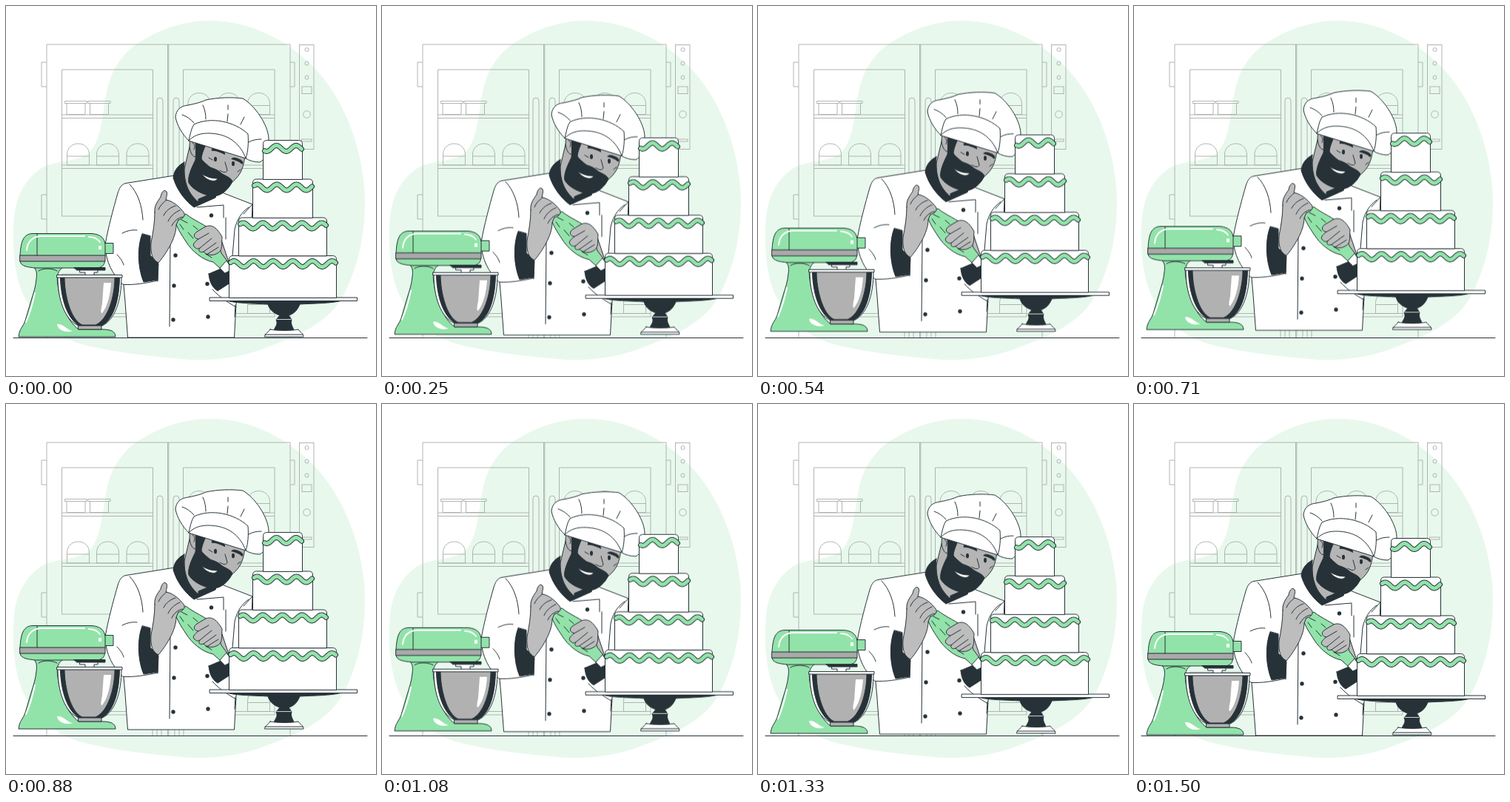
An HTML page that plays this animation: 500 px wide and 500 px high, repeating every 1540 ms.

```html
<!DOCTYPE html>
<html lang="en">
<head>
<meta charset="utf-8">
<title>Pastry chef</title>
<style>
  html, body { margin: 0; width: 100%; height: 100%; overflow: hidden; background: #fff; }
  svg { display: block; width: 100%; height: 100%; }
  .thin { fill: none; stroke: #a9adaa; stroke-width: .9; }
  .ink { stroke: #263238; stroke-width: 1; stroke-linejoin: round; stroke-linecap: round; }
  .white { fill: #fff; }
  .green { fill: #92e3a9; }
  .skin { fill: #b5b5b5; }
  .hand { fill: #bdbdbd; }
  .steel { fill: #b1b1b1; }
  .dark { fill: #263238; }
  .line { fill: none; }
  .shine { fill: none; stroke: #fff; stroke-width: 2; stroke-linecap: round; }
  .float { animation: float 1540ms linear infinite; }
  @keyframes float {
    0%, 95.5%, 100% { transform: translateY(0); }
    47.5% { transform: translateY(-10px); }
  }
</style>
</head>
<body>
<svg viewBox="0 0 500 500">
  <defs>
    <g id="dome">
      <path d="M-15 17V15C-15 -5 15 -5 15 15V17"/>
      <path d="M-15 17H15V29H-15Z"/>
    </g>
    <g id="pot">
      <path d="M-15 0H15V3H-15ZM-12.5 3V18H12.5V3"/>
    </g>
  </defs>

  <path fill="#e8f8ed" d="M270 20C330 18 380 47 413 80C456 122 481 190 484.500 250C487 300 478 352 453 396C430 434 380 451 340 466C312 475 282 479 250 478C198 474 138 467 99 456C61 444 36 419 22 387C10 357 8 317 11 285C14 256 27 233 48 219C68 208 94 211 110 200C130 185 130 143 137 112C143 86 157 64 180 49C207 32 237 21 270 20Z"/>

  <!-- cabinet -->
  <g class="thin">
    <path d="M55 448V52H384V448M218.500 52V448M219.800 52V448"/>
    <path d="M55 76H48V109H55M55 255H48V288H55M384 76H390V109H384"/>
    <path d="M75.500 86H198.500V284H75.500ZM75.500 147H198.500M75.500 151.500H198.500M75.500 215H198.500M75.500 219.500H198.500"/>
    <path d="M239.500 86H363V284H239.500ZM239.500 147H363M239.500 151.500H363M239.500 215H363M239.500 219.500H363"/>
    <rect x="204" y="124" width="8" height="112" rx="4"/>
    <rect x="226" y="124" width="8" height="112" rx="4"/>
    <path d="M75.500 362H198.500V420H75.500ZM75.500 415.500H198.500M239.500 362H363V420H239.500ZM239.500 415.500H363"/>
    <path d="M198 420V448M204 420V448M210 420V448M228 420V448M234 420V448M240 420V448"/>
    <use href="#pot" x="94.500" y="128.500"/><use href="#pot" x="126" y="128.500"/>
    <use href="#dome" x="97.500" y="186"/><use href="#dome" x="137.500" y="186"/><use href="#dome" x="178" y="186"/>
    <use href="#dome" x="261" y="117.500"/><use href="#dome" x="301" y="117.500"/><use href="#dome" x="341.500" y="117.500"/>
    <use href="#dome" x="341.500" y="386.500"/>
    <rect x="396.500" y="52.500" width="19.500" height="141"/>
    <circle cx="406.500" cy="59" r="2.500"/><circle cx="406.500" cy="77.500" r="2.500"/><circle cx="406.500" cy="96.500" r="2.500"/>
    <rect x="400" y="109" width="13" height="9.500"/>
    <circle cx="406.500" cy="146.500" r="4.800"/>
    <rect x="399.500" y="180" width="13.500" height="3"/>
  </g>

  <g class="float">
    <!-- jacket -->
    <g class="ink">
      <path class="white" d="M228 229L162 239.500C155 241 153 247 151 253C145 274 138 300 134.500 320C133 337 140 357 153 371C155 374 157 376 159 376.500L161 400L164.500 448H308.500L311 402L330 345L333 268L284 249Z"/>
      <path class="line" d="M167 241C178 252 184 270 185 289M157 307C163 304 170 302 177 303M150 336C155 341 158 346 159 350"/>
      <path class="line" d="M159 376.500C173 377 187 375 205 371M205 348V372M222 320L221 433M258 272L294 269V286M297 286V315"/>
      <path class="line" d="M328 272C319 278 312 288 309 302L306 338M333 268L321 281"/>
      <path class="line" d="M279 383C288 393 299 400 311 407M310 404L309 420"/>
    </g>
    <g class="dark">
      <circle cx="277.500" cy="283" r="2.700"/><circle cx="229" cy="337" r="2.700"/><circle cx="227" cy="378" r="2.700"/>
      <circle cx="226" cy="424" r="2.700"/><circle cx="272" cy="375.500" r="2.700"/><circle cx="273" cy="420" r="2.700"/>
    </g>

    <!-- head -->
    <g class="ink">
      <path class="skin" d="M251 178L241 220C240 243 249 260 257 267L284 255L290 230L270 180Z"/>
      <path class="dark" d="M241 211C233 215 227 222 226 232C231 249 242 263 254 272L283 259L286 250L260 261V265C247 254 239 239 241 211Z"/>
      <path class="skin" d="M257 176C247 174 246 192 251 200C253 204 257 205 260 202Z"/>
      <path class="skin" d="M259 174C256 205 257 235 270 249C284 257 296 249 303 240C315 231 321 222 323 201L310 172L270 168Z"/>
      <path class="dark" d="M256 172C256 188 257 198 256 208C251 218 245 231 247 239C253 249 268 256 280 257C292 257 302 246 306 237C303 231 297 230 291 226C286 221 281 220 276 218C270 213 265 209 264 206C265 196 271 187 276 172Z"/>
      <path class="white" d="M265 227C273 232 279 233 286 233C284 239 271 237 265 227Z"/>
      <path class="line" d="M296 211L299 222C298 226 293 225 289 222M274 205L279 208M313 224L317 221M252 185C255 186 256 190 254 194"/>
    </g>
    <g class="dark">
      <path d="M278 196C277 191 281 189 287 191C292 193 297 197 296 201C291 199 284 195 278 196Z"/>
      <path d="M304 207C307 203 312 205 316 207C320 209 322 212 319 214C315 210 309 208 304 207Z"/>
      <ellipse cx="283" cy="207" rx="2" ry="3.200"/><ellipse cx="307" cy="213" rx="2" ry="3.200"/>
    </g>

    <!-- hat -->
    <g class="ink">
      <path class="white" d="M247 182C238 173 231 161 229 150C230 140 236 135 246 134C256 132 264 130 270 127C286 123.500 306 123 320 125C336 134 354 160 355 179C355 197 350 208 343 211C335 211 329 209 324 206Z"/>
      <path class="white" d="M247 182C249 174 250 166 254 160C277 149 309 156 327 173C328 185 327 197 324 206C317 187 303 176 285 173C272 171 257 171 247 182Z"/>
      <path class="line" d="M238 147C244 149 250 153 254 158M266 134C269 140 270 147 270 153M300 134V140M300 146L299 156M322 150L317 160M345 180C339 180 333 181 328 184"/>
    </g>

    <!-- arms and piping bag -->
    <g class="ink">
      <path class="dark" d="M184 308C177 326 178 354 186 373L205 370L206 348L195 337L195 311Z"/>
      <path class="dark" d="M274 362L300 351L303 374L286 385C278 380 275 372 274 362Z"/>
      <path class="hand" d="M284 334L291 316L301 346L292 356Z"/>
      <path class="green" d="M232 290L243 281C254 290 270 296 279 304C287 314 288 326 291 334L300 346L291 356L280 346C265 343 251 331 243 318C237 309 232 301 230 295Z"/>
      <path class="white" d="M289 354L298 344L302 350V358L296 361Z"/>
      <path class="line" d="M237 289L245 293M235 295L240 302M246 306L253 314M253 297L259 302M270 335L278 340"/>
      <path class="hand" d="M201 279C200 270 205 264 209 258C210 252 213 248 216 250C219 252 217 257 216 262C224 263 234 270 241 280C242 285 238 288 233 289L230 296C230 314 216 335 206 347C198 343 195 335 196 320C199 305 201 292 201 279Z"/>
      <path class="line" d="M217 262C212 266 208 270 206 275M229 270C222 272 216 277 213 283M235 276C228 279 222 284 219 291M239 285C232 286 227 291 224 297"/>
      <path class="hand" d="M255 326C250 323 256 318 260 315C254 314 252 309 258 305L268 299C278 293 286 301 292 312C291 322 294 331 284 335C278 338 270 336 267 332C262 334 259 331 262 327C259 329 257 328 255 326Z"/>
      <path class="line" d="M260 315L274 307M262 327L278 314M267 332L284 320M271 336L287 326"/>
    </g>

    <!-- mixer -->
    <g class="ink">
      <path class="green" d="M34 351C42 354 42 362 41 369C40 380 37 388 34 398L26 425C23 434 18 436 17 447H148C148 440 142 437 130 437H98C82 425 73 400 70 377C68 365 70 356 78 353Z"/>
      <path class="green" d="M19 345C20 352 30 353 40 354H121C130 354 133 350 133.500 345Z"/>
      <path class="line" d="M44 358C50 354 62 354 69 358"/>
      <path class="dark" d="M92 353.500H134V357H96Z"/>
      <path class="white" d="M100 357H124V360H119V365H107V360H100Z"/>
      <path class="green" d="M132 320.500H145V334.500H132Z"/>
      <path class="green" d="M19 337C20 317 24 308 36 307.500H116C128 308.500 133 314 134 322V337Z"/>
      <path fill="#a9a9a9" d="M19 337H134V345H19Z"/>
      <path class="line" d="M42 307.500V337"/>
      <path class="white" d="M70 367C70 396 79 424 98 432H130C148 424 156 396 156 367Z"/>
      <path class="dark" d="M73.500 367C74 396 83 423 99 432H129C146 424 153 396 153.500 367Z"/>
      <path class="steel" d="M79 367C79 390 87 424 103 431H121C138 424 147 392 147 367Z"/>
      <path class="steel" d="M98 432H129V437H98Z"/>
      <path class="white" d="M69 363.500H157V367H69Z"/>
    </g>
    <g class="shine">
      <path d="M28 330C29 319 34 312 47 311H106M112 312C119 312 124 315 127 319"/>
      <path d="M127 324V329" stroke-width="4" stroke-linecap="butt"/>
      <path d="M39 388C36 402 32 416 27 427"/>
    </g>
    <g class="white">
      <path d="M132 374H142C141 391 137 406 130 415C127 416 129 407 130 402Z"/>
      <path d="M69 430C78 429 81 437 90 439C83 442 70 439 69 430Z"/>
    </g>

    <!-- cake stand -->
    <g class="ink">
      <path class="dark" d="M298 398H454C442 402 412 402 397 403C394 411 389 416 382 418L386 424C384 430 388 434 389 438H362C364 433 368 430 365 424L370 418C361 415 356 410 354 403C338 402 309 402 298 398Z"/>
      <path class="white" d="M357 437C366 439 386 439 395 437C397 441 402 442 402 447H349.500C350 442 355 441 357 437Z"/>
      <path class="line" d="M350 444H401"/>
      <path class="line" d="M366 423.500H385" style="stroke:#fff;stroke-width:.8"/>
      <path class="white" d="M275.500 394H474.500V398.500H275.500Z"/>
    </g>
    <g id="cake"></g>
  </g>

  <path class="ink" d="M10 448.500H488"/>
</svg>
<script>
  const cake = document.getElementById('cake');

  // Tier: left, right, top, bottom, x of the first icing crest
  const tiers = [
    [301.5, 446.5, 337.5, 394, 308],
    [314.5, 433.5, 286, 337.5, 320.5],
    [333.5, 414.5, 234, 286, 339.5],
    [347.5, 400.5, 181.5, 234, 365.5]
  ];

  function icing(left, right, mid, crest) {
    let d = '';
    for (let x = left; x <= right; x++) {
      const y = mid - 4 * Math.cos((x - crest) / 26.5 * 2 * Math.PI);
      d += (d ? 'L' : 'M') + x + ' ' + y.toFixed(2);
    }
    return d;
  }

  function stroke(d, color, width) {
    return `<path d="${d}" fill="none" stroke="${color}" stroke-width="${width}" stroke-linecap="round" stroke-linejoin="round"/>`;
  }

  cake.innerHTML = tiers.map(([l, r, t, b, crest]) => {
    const wave = icing(l + 2, r - 1, t + 11, crest);
    return `<path class="ink white" d="M${l} ${b}V${t + 5}Q${l} ${t} ${l + 5} ${t}H${r - 5}Q${r} ${t} ${r} ${t + 5}V${b}Z"/>`
      + stroke(wave, '#263238', 7) + stroke(wave, '#92e3a9', 5);
  }).join('');
</script>
</body>
</html>
```
